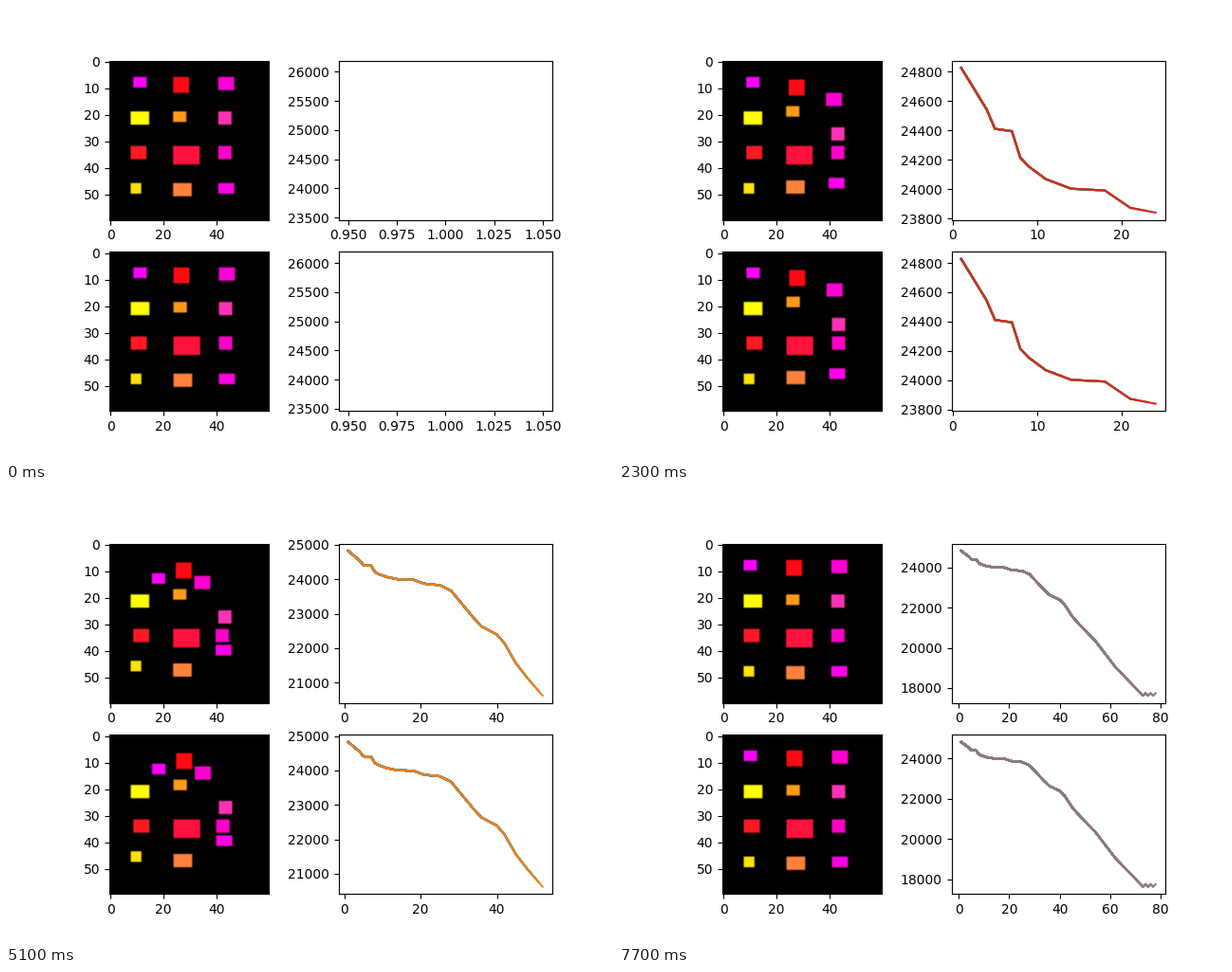
Recreate the animation shown at these times as a matplotlib script. Size 640 by 480 pixels, loop 7.8 s.

```python
from itertools import product

import numpy as np
import matplotlib.pyplot as plt
from matplotlib.animation import FuncAnimation
from matplotlib.colors import to_rgb

SIZE = 60
FRAMES = 78
SETTLED = 73  # from here on the last block only jitters

# Blocks stand on a grid, row by row: name, width, height, colour.
ROWS, COLS = (6, 19, 32, 46), (8, 24, 41)
BLOCKS = [
    ("A", 5, 4, "#ff00ff"), ("B", 6, 6, "#ff0a14"), ("C", 6, 5, "#ff00d2"),
    ("D", 7, 5, "#ffff00"), ("E", 5, 4, "#ff9b19"), ("F", 5, 5, "#ff32b4"),
    ("G", 6, 5, "#ff1923"), ("H", 10, 7, "#ff123c"), ("I", 5, 5, "#ff00c8"),
    ("J", 4, 4, "#ffe10a"), ("K", 7, 5, "#ff823c"), ("L", 6, 4, "#ff00e6"),
]

# One block moves one cell per step: block, direction, cells.
LEGS = ("Ar1 Cl2 Ll1 Lu1 Gr1 Fd4 Cd4 Ku1 Bd1 Br1 Cd2 Fd2 Eu2 Lu4 Cl7 "
        "Lu3 Il1 Ju2 Ar1 Ad4 Ar2 Ad1 Ar6 Gr5 Ad3 Gr3 Ad8")
STEP = {"r": (1, 0), "l": (-1, 0), "d": (0, 1), "u": (0, -1)}

# Bends of the cost curve.
BENDS = [(1, 24827), (4, 24545), (5, 24411), (7, 24395), (8, 24214),
         (9, 24154), (11, 24069), (14, 24003), (18, 23991), (21, 23873),
         (25, 23829), (28, 23668), (34, 22866), (36, 22630), (40, 22397),
         (42, 22140), (45, 21563), (48, 21135), (54, 20365), (62, 19053),
         (SETTLED, 17620)]

moves = [leg[:2] for leg in LEGS.split() for _ in range(int(leg[2:]))]
moves += ["Ad" if n % 2 else "Au" for n in range(len(moves) + 1, FRAMES + 1)]

steps = np.arange(1, FRAMES + 1)
cost = np.interp(steps, *zip(*BENDS))
cost[(steps > SETTLED) & (steps % 2 == 0)] += 120


def picture(done):
    """Paint the blocks after the given number of moves."""
    shift = {name: np.zeros(2, int) for name, *_ in BLOCKS}
    for name, way in moves[:done]:
        shift[name] += STEP[way]
    img = np.zeros((SIZE, SIZE, 3))
    for (row, col), (name, w, h, colour) in zip(product(ROWS, COLS), BLOCKS):
        x, y = shift[name] + (col, row)
        img[y:y + h, x:x + w] = to_rgb(colour)
    return img


fig, axes = plt.subplots(2, 2, figsize=(6.4, 4.8), dpi=100)
images = [ax.imshow(picture(0)) for ax in axes[:, 0]]
charts = axes[:, 1]
# Every step plots the whole curve again in the next cycle colour.
curves = [[ax.plot(steps[:n], cost[:n])[0] for n in steps] for ax in charts]


def update(i):
    # The layout returns to its start on the last step.
    img = picture(0 if i == FRAMES - 1 else i + 1)
    for im in images:
        im.set_data(img)
    for ax, lines in zip(charts, curves):
        for k, line in enumerate(lines):
            line.set_visible(k <= i)
        ax.relim(visible_only=True)
        ax.autoscale_view()
    return []


anim = FuncAnimation(fig, update, frames=FRAMES, init_func=lambda: update(0),
                     interval=100, repeat=True, repeat_delay=0, blit=False)
plt.show()
```
